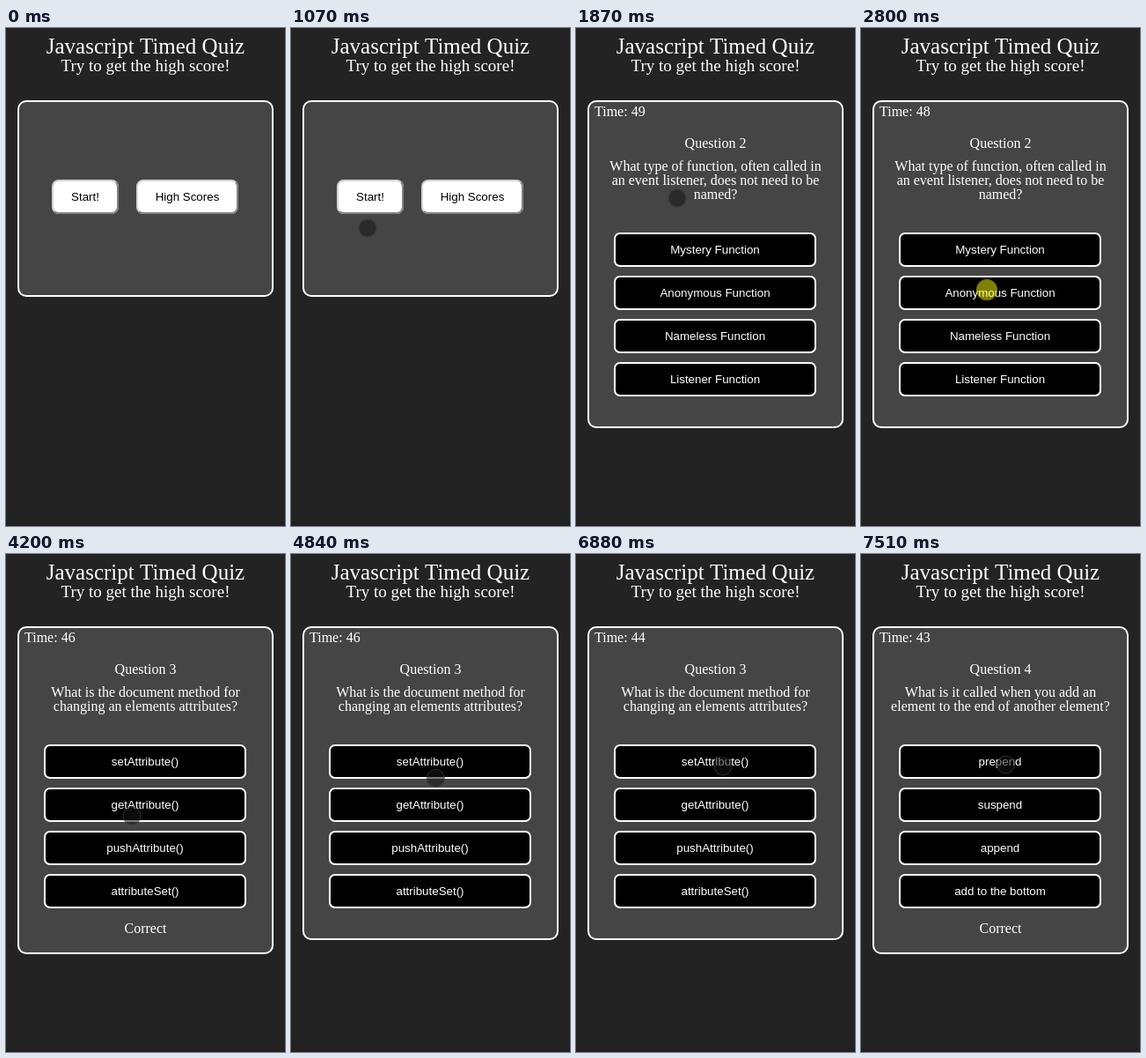
Write an HTML page with a canvas that moves like this. It is 317 by 565 pixels and loops after 8000 ms.

```html
<!DOCTYPE html>
<html lang="en">
<head>
<meta charset="utf-8">
<title>Javascript Timed Quiz</title>
<style>
  html, body { margin: 0; width: 100%; height: 100%; overflow: hidden; background: #232323; }
  canvas { display: block; }
</style>
</head>
<body>
<canvas id="stage" width="317" height="565"></canvas>
<script>
const ctx = document.getElementById('stage').getContext('2d');
const LOOP = 8000;
const SERIF = '"Liberation Serif", "Times New Roman", serif';
const SANS = '"Liberation Sans", Arial, sans-serif';
const CENTER = 158.5;

const questions = [
  { from: 1870, title: 'Question 2',
    lines: ['What type of function, often called in', 'an event listener, does not need to be', 'named?'],
    answers: ['Mystery Function', 'Anonymous Function', 'Nameless Function', 'Listener Function'] },
  { from: 2960, title: 'Question 3', correctUntil: 4440,
    lines: ['What is the document method for', 'changing an elements attributes?'],
    answers: ['setAttribute()', 'getAttribute()', 'pushAttribute()', 'attributeSet()'] },
  { from: 7350, title: 'Question 4', correctUntil: LOOP,
    lines: ['What is it called when you add an', 'element to the end of another element?'],
    answers: ['prepend', 'suspend', 'append', 'add to the bottom'] }
];

// Pointer strokes: the waypoints are spread evenly over the steps.
const strokes = [
  { from: 450, steps: 5, path: [[257, 556], [183, 453], [120, 355], [92, 303], [74.5, 274.5]] },
  { from: 910, steps: 7, path: [[75.5, 266], [87, 227], [93, 201], [95, 192]] },
  { from: 1700, steps: 1, path: [[94, 192]] },
  { from: 1870, steps: 11, every: 77, path: [[115, 193], [122, 205], [133, 240], [139, 272], [142, 290], [143, 297]] },
  { from: 4600, steps: 6, path: [[145, 293], [158, 268], [166, 251], [169.5, 244.5]] },
  { from: 5150, steps: 3, path: [[169.5, 243], [169.5, 240]] },
  { from: 5780, steps: 8, path: [[169, 238], [169, 246], [168, 256], [168, 261.5]] },
  { from: 6490, steps: 2, path: [[168, 250], [167.5, 241]] },
  { from: 6880, steps: 2, path: [[167, 241], [165, 240]] },
  { from: 7430, steps: 2, path: [[164.5, 239.5], [164.5, 239]] }
];

// Press times: the highlight starts faint, then turns full.
const presses = [
  { from: 1700, full: 1700, to: 1870 },
  { from: 2720, full: 2800, to: 2960 },
  { from: 7110, full: 7190, to: 7350 }
];

const ticks = [2200, 3200, 4200, 5200, 6180, 7190];

function latest(list, t) {
  return list.filter(item => item.from <= t).pop();
}

function text(str, x, y, font, color = '#fff', align = 'center') {
  ctx.font = font;
  ctx.fillStyle = color;
  ctx.textAlign = align;
  ctx.fillText(str, x, y);
}

function box(x, y, w, h, radius, color) {
  ctx.fillStyle = color;
  ctx.beginPath();
  ctx.roundRect(x, y, w, h, radius);
  ctx.fill();
}

function framed(x, y, w, h, radius, fill) {
  box(x, y, w, h, radius, '#fff');
  box(x + 2, y + 2, w - 4, h - 4, radius - 2, fill);
}

function panel(height) {
  framed(13, 82, 291, height, 10, '#454545');
}

function menuButton(label, x, w) {
  const y = 172, h = 39;
  box(x, y, w, h, 8, '#d2d2d2');
  // Shaded lower right half of the outset border
  ctx.save();
  ctx.beginPath();
  ctx.moveTo(x + w, y);
  ctx.lineTo(x + w - 8, y + 8);
  ctx.lineTo(x + 8, y + h - 8);
  ctx.lineTo(x, y + h);
  ctx.lineTo(x + w, y + h);
  ctx.clip();
  box(x, y, w, h, 8, '#858585');
  ctx.restore();
  box(x + 2, y + 2, w - 4, h - 4, 6, '#fff');
  text(label, x + w / 2, y + 24, `13.333px ${SANS}`, '#000');
}

function drawMenu() {
  panel(223);
  menuButton('Start!', 52, 76);
  menuButton('High Scores', 148, 116);
}

function drawQuestion(question, t) {
  const serif = `16px ${SERIF}`;
  const top = 184 + question.lines.length * 16;
  const correct = t < (question.correctUntil || 0);
  panel(top + 140 + (correct ? 16 : 0) + 0 + 82 - 82 + 0);
  const seconds = 49 - ticks.filter(tick => tick <= t).length;
  text(`Time: ${seconds}`, 21, 100, serif, '#fff', 'left');
  text(question.title, CENTER, 136, serif);
  question.lines.forEach((line, i) => text(line, CENTER, 162 + i * 16, serif));
  question.answers.forEach((answer, i) => {
    const y = top + i * 49;
    framed(43, y, 230, 39, 7, '#000');
    text(answer, 158, y + 24, `13.333px ${SANS}`);
  });
  if (correct) text('Correct', CENTER, 430, serif);
}

function pointerAt(t) {
  const stroke = latest(strokes, t);
  if (!stroke) return null;
  const { from, steps, every = 80, path } = stroke;
  const step = Math.min(steps - 1, Math.floor((t - from) / every));
  const place = steps > 1 ? step / (steps - 1) * (path.length - 1) : 0;
  const i = Math.floor(place);
  const a = path[i], b = path[Math.min(i + 1, path.length - 1)];
  return a.map((v, k) => v + (b[k] - v) * (place - i));
}

function disc(x, y, radius, fill, rim) {
  ctx.beginPath();
  ctx.arc(x, y, radius, 0, Math.PI * 2);
  ctx.fillStyle = fill;
  ctx.fill();
  ctx.beginPath();
  ctx.arc(x, y, radius - 0.5, 0, Math.PI * 2);
  ctx.strokeStyle = rim;
  ctx.lineWidth = 1;
  ctx.stroke();
}

function drawPointer(t) {
  const point = pointerAt(t);
  if (!point) return;
  const press = presses.find(p => t >= p.from && t < p.to);
  if (!press) {
    disc(...point, 10.5, 'rgba(20,20,20,.55)', 'rgba(90,90,90,.45)');
  } else if (t < press.full) {
    disc(...point, 11.5, 'rgba(140,140,0,.5)', 'rgba(110,110,0,.4)');
  } else {
    disc(...point, 12, 'rgba(255,255,0,.5)', 'rgba(110,110,0,.4)');
  }
}

function draw(t) {
  ctx.fillStyle = '#232323';
  ctx.fillRect(0, 0, 317, 565);
  ctx.fillStyle = '#211f20';
  ctx.fillRect(0, 560, 317, 5);
  text('Javascript Timed Quiz', CENTER, 29, `25px ${SERIF}`);
  text('Try to get the high score!', CENTER, 49, `19px ${SERIF}`);
  const question = latest(questions, t);
  if (question) drawQuestion(question, t);
  else drawMenu();
  drawPointer(t);
}

const start = performance.now();
function frame() {
  draw((performance.now() - start) % LOOP);
  requestAnimationFrame(frame);
}
frame();
</script>
</body>
</html>
```
